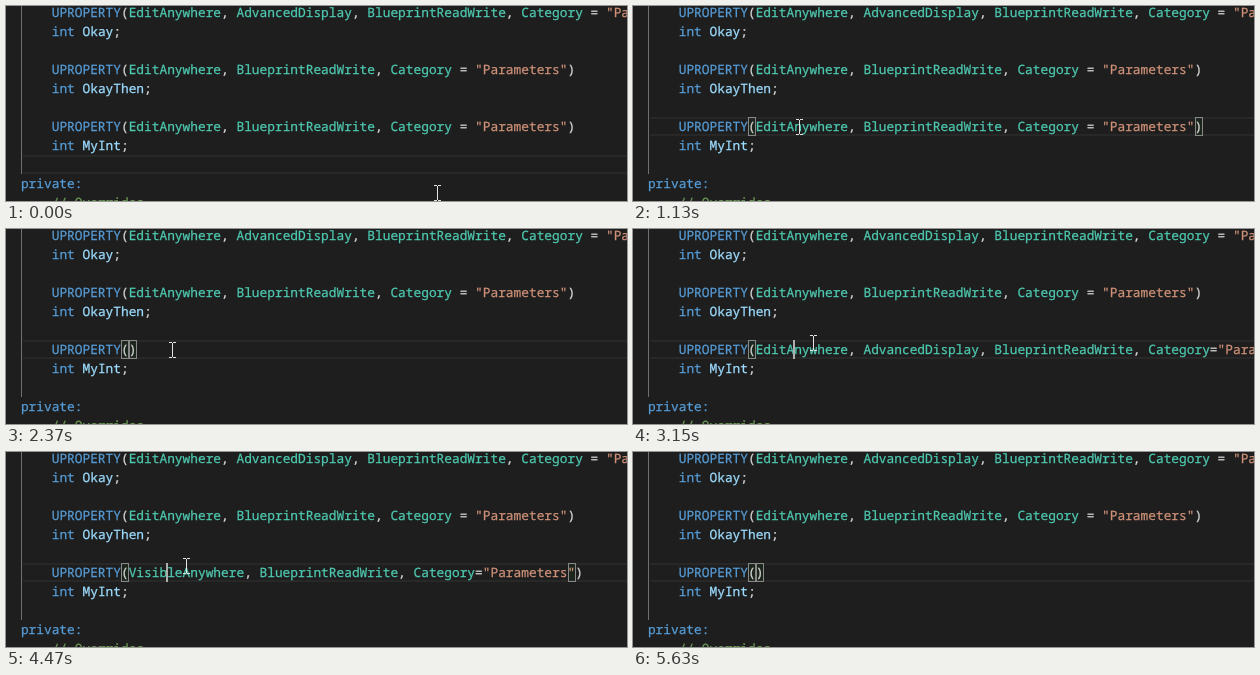
Animation, 621 px wide and 195 px high, one loop 6090 ms. Source, as an HTML page:

```html
<!DOCTYPE html>
<html lang="en">
<head>
<meta charset="utf-8">
<title>Code editor</title>
<style>
  html, body { margin: 0; width: 100%; height: 100%; overflow: hidden; background: #1e1e1e; }
  svg { display: block; }
  text { font: 12.83px "Noto Sans Mono", "DejaVu Sans Mono", monospace; white-space: pre;
         color: #d4d4d4; text-rendering: geometricPrecision; }
  text, tspan { fill: currentColor; stroke: currentColor; stroke-width: .25px; }
  .keyword { color: #569cd6; }
  .name { color: #9cdcfe; }
  .spec { color: #4ec9b0; }
  .string { color: #ce9178; }
  .comment { color: #6a9955; }
  .bracket { fill: rgba(0, 100, 0, .1); stroke: #888; }
</style>
</head>
<body>
<svg width="621" height="195">
  <path id="active" d="M17 1H621M17 18H621" stroke="#282828" stroke-width="2"/>
  <rect x="15" width="1" height="168" fill="#707070"/>
  <g id="brackets">
    <rect class="bracket" y="111.5" width="7" height="18"/>
    <rect class="bracket" y="111.5" width="7" height="18"/>
  </g>
  <g id="code"></g>
  <rect id="caret" y="111" width="2" height="19" fill="#aeafad"/>
  <path id="mouse" d="M-3.5 -7.5h3m1 0h3M0 -7V7M-3.5 7.5h3m1 0h3" fill="none" stroke="#e4e4e4"/>
</svg>
<script>
const LOOP = 6090, TICK = 76.1, CLICK = 670, LAG = 70, BLINK = 500;
const LEFT = 14.9, CHAR = 7.7, ROW = 19, TOP = -3, EDIT_ROW = 6, BLANK_ROW = 8;
const get = id => document.getElementById(id);
const colX = col => LEFT + col * CHAR;
const rowY = row => TOP + row * ROW;

const macro = args => `    UPROPERTY(${args})`;
const edit = macro('EditAnywhere, BlueprintReadWrite, Category = "Parameters"');
const visible = macro('VisibleAnywhere, BlueprintReadWrite, Category="Parameters"');
const advanced = macro('EditAnywhere, AdvancedDisplay, BlueprintReadWrite, Category="Parameters"');
const empty = macro('');

const lines = [
  macro('EditAnywhere, AdvancedDisplay, BlueprintReadWrite, Category = "Parameters"'),
  '    int Okay;', '', edit, '    int OkayThen;', '', edit, '    int MyInt;', '',
  'private:', '    // Overrides'
];

// The edits go forward to the empty macro, back by undo, and forward again.
const edits = [[0, edit], [1210, visible], [1520, advanced], [1910, empty], [3080, advanced],
  [3380, visible], [3690, edit], [4470, visible], [4780, advanced], [5010, empty]];
const textAt = t => edits.findLast(([start]) => start <= t)[1];

// The caret blinks afresh after each move.
const caretMoves = [CLICK, 1910, 3080, 5090];
function caretOn(t) {
  const start = caretMoves.findLast(move => move <= t);
  return start && (t - start + 40) % (2 * BLINK) < BLINK;
}

// Time, x, y of the pointer's turning points.
const path = [[0, 431, 187], [440, 96, 118], [CLICK, 166, 121], [2370, 166, 121],
  [2680, 180, 114], [5250, 180, 114], [5600, 540, 203], [LOOP, 540, 203]];
function pointerAt(t) {
  const tick = Math.floor((t + 15) / TICK) * TICK;
  const i = path.findLastIndex(([start]) => start <= tick);
  const from = path[i], to = path[i + 1] || from;
  const u = Math.min(1, (tick - from[0]) / (to[0] - from[0] || 1));
  const ease = u * u * (3 - 2 * u);
  return [1, 2].map(k => Math.round(from[k] + (to[k] - from[k]) * ease));
}

const kinds = [
  ['comment', /^\/\//], ['string', /^"/], ['keyword', /^(UPROPERTY|int|private:)$/],
  ['name', /^(Okay|OkayThen|MyInt)$/], ['spec', /^\w/]
];
function colour(line) {
  return line.replace(/\/\/.*|"[^"]*"|\w+:?/g, word => {
    const [kind] = kinds.find(([, pattern]) => pattern.test(word));
    return `<tspan class="${kind}">${word}</tspan>`;
  });
}

get('code').innerHTML = lines.map((line, row) =>
  `<text x="${LEFT}" y="${rowY(row) + 14}">${colour(line)}</text>`).join('');
const editLine = get('code').children[EDIT_ROW];
const [open, close] = get('brackets').children;
const frame = (box, col) => box.setAttribute('x', Math.round(colX(col)) + .5);
const show = (el, on) => el.setAttribute('visibility', on ? 'visible' : 'hidden');
const move = (el, x, y) => el.setAttribute('transform', `translate(${x} ${y})`);
frame(open, edit.indexOf('('));

function draw(now) {
  const t = now % LOOP;
  const clicked = t >= CLICK;
  const settled = textAt(Math.max(0, t - LAG));
  const [x, y] = pointerAt(t);

  editLine.innerHTML = colour(textAt(t));
  move(get('active'), 0, rowY(clicked ? EDIT_ROW : BLANK_ROW));
  show(get('brackets'), clicked);
  frame(close, settled.length - 1);

  show(get('caret'), caretOn(t) && y < 195);
  get('caret').setAttribute('x', Math.floor(colX(Math.min(19, settled.length)) - 1));
  move(get('mouse'), x + .5, y);
  requestAnimationFrame(draw);
}
draw(0);
</script>
</body>
</html>
```
